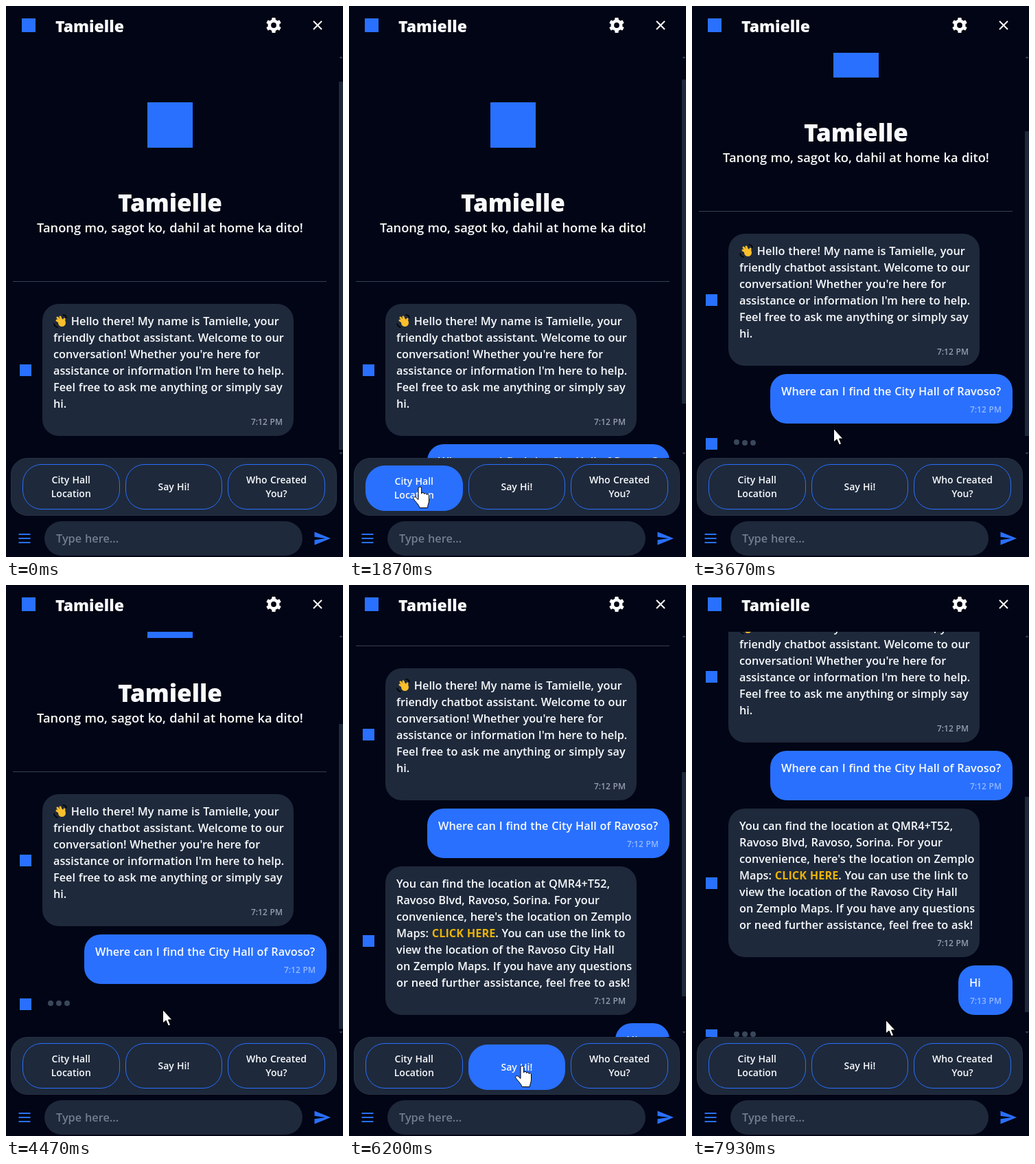
Animation of 491 by 801 pixels, one loop 8 s. Source, as an HTML page:

```html
<!DOCTYPE html>
<html lang="en">
<head>
<meta charset="utf-8">
<title>Chat assistant</title>
<style>
  :root { --bg: #020515; --slate: #1e293b; --line: #334155; --blue: #2970ff; }
  html, body { margin: 0; width: 100%; height: 100%; overflow: hidden; background: var(--bg); }
  body { position: relative; color: #f8fafc; font: 600 16.3px/24px "Open Sans", "Noto Sans", sans-serif; word-spacing: .6px; white-space: nowrap; }
  body * { position: absolute; box-sizing: border-box; }
  p, b, br, .wave, .wave * { position: static; }
  p { margin: 0; }
  svg { overflow: visible; }
  .logo { background: var(--blue); }
  .name { font-weight: 800; }
  .center { left: 0; width: 478px; text-align: center; }

  #view { left: 0; top: 68px; width: 491px; height: 589px; overflow: hidden; }
  #feed { left: 0; top: -68px; width: 491px; height: 1100px; }
  .bubble { padding: 13px 16px; border-radius: 24px; background: var(--slate); }
  .bot { left: 53px; width: 366px; }
  .user { right: 24px; background: var(--blue); }
  .bubble i { right: 16px; bottom: 8px; font-size: 12px; font-style: normal; color: #949eae; }
  .user i { color: #94b8ff; }
  .bubble b { color: #eab308; }
  .wave { display: inline-block; width: 20px; height: 20px; margin-right: 1px; vertical-align: -4px; }
  .face { left: 20px; width: 17px; height: 17px; }
  .dot { top: 12px; width: 8px; height: 8px; border-radius: 50%; background: #3a475a; }
  #thumb { left: 485px; width: 6px; background: var(--slate); }

  #panel { left: 7px; top: 657px; width: 475px; height: 84px; border: 1px solid #273346; border-radius: 24px; background: var(--slate); }
  .chip { top: 666px; width: 141.6px; height: 66px; border: 1px solid var(--blue); border-radius: 28px;
    display: flex; align-items: center; justify-content: center; text-align: center; font-size: 14px; line-height: 20px; }
  .chip.hot { background: var(--blue); }
  #field { left: 56px; top: 749px; width: 376px; height: 50px; padding-left: 17px; border-radius: 25px; background: var(--slate); color: #727e8f; line-height: 51px; }
</style>
</head>
<body>
<div id="view">
  <div id="feed">
    <div class="logo" style="left:206px;top:140px;width:66px;height:66px"></div>
    <div class="center name" style="top:262px;font-size:35px;line-height:48px">Tamielle</div>
    <div class="center" style="top:310px;font-size:18.300px">Tanong mo, sagot ko, dahil at home ka dito!</div>
    <div style="left:10px;top:400px;width:457px;height:1px;background:var(--line)"></div>

    <div class="logo face" style="top:521px"></div>
    <div class="bubble bot" style="top:433px;height:192px">
      <p><svg class="wave" viewBox="0 0 20 20" fill="none" stroke="#fbbf2c" stroke-width="3" stroke-linecap="round">
        <circle cx="12.5" cy="12.5" r="4" fill="#fbbf2c"/>
        <path d="M11 13L5 9M11 11L6 5M12.500 10L10 4M15 13L16 7"/>
        <path d="M1 14q1 4 5 5M14 1q4 0 5 4" stroke="#000" stroke-width="1.500"/>
      </svg> Hello there! My name is Tamielle, your</p>
      <p>friendly chatbot assistant. Welcome to our</p>
      <p>conversation! Whether you're here for</p>
      <p>assistance or information I'm here to help.</p>
      <p>Feel free to ask me anything or simply say</p>
      <p>hi.</p>
      <i>7:12 PM</i>
    </div>

    <div id="ask" class="bubble user" style="top:637px;width:353px;height:72px">
      <p>Where can I find the City Hall of Ravoso?</p><i>7:12 PM</i>
    </div>

    <div id="reply">
      <div class="logo face" style="top:821px"></div>
      <div class="bubble bot" style="top:721px;height:216px">
        <p>You can find the location at QMR4+T52,</p>
        <p>Ravoso Blvd, Ravoso, Sorina. For your</p>
        <p>convenience, here's the location on Zemplo</p>
        <p>Maps: <b>CLICK HERE</b>. You can use the link to</p>
        <p>view the location of the Ravoso City Hall</p>
        <p>on Zemplo Maps. If you have any questions</p>
        <p>or need further assistance, feel free to ask!</p>
        <i>7:12 PM</i>
      </div>
    </div>

    <div id="hi" class="bubble user" style="top:949px;width:79px;height:72px"><p>Hi</p><i>7:13 PM</i></div>

    <div id="typing">
      <div class="logo face" style="top:9px"></div>
      <div class="dot" style="left:61px"></div>
      <div class="dot" style="left:73px"></div>
      <div class="dot" style="left:85px"></div>
    </div>
  </div>
</div>
<div id="thumb"></div>

<div class="logo" style="left:23px;top:18px;width:20px;height:20px"></div>
<div class="name" style="left:72px;top:13px;font-size:23px;line-height:32px">Tamielle</div>

<div id="panel"></div>
<div class="chip" style="left:24px"><p>City Hall<br>Location</p></div>
<div class="chip" style="left:173.600px"><p>Say Hi!</p></div>
<div class="chip" style="left:323.200px"><p>Who Created<br>You?</p></div>
<div id="field">Type here...</div>

<svg width="491" height="801" style="left:0;top:0">
  <g transform="translate(390 28)" fill="#fff">
    <circle r="6.2" fill="none" stroke="#fff" stroke-width="4.6"/>
    <g id="teeth"><rect id="tooth" x="-2.7" y="-11" width="5.400" height="5" rx="1"/></g>
  </g>
  <path d="M448 22l12 12m0-12l-12 12" stroke="#fff" stroke-width="2"/>
  <path d="M485.500 76l2.500-3 2.500 3zM485.500 649l2.500 3 2.500-3z" fill="#334155"/>
  <path d="M18.500 768h17m-17 6h17m-17 6h17" stroke="#2970ff" stroke-width="2"/>
  <path d="M449.500 764.500l23.500 9.500-23.500 9.500v-7.200l16-2.300-16-2.300z" fill="#2970ff"/>
  <g id="cursor" fill="#fff" stroke="#000" stroke-width="1" stroke-linejoin="round">
    <path id="arrow" d="M.5 .5V20L5 16 8.500 24 11.500 22.500 8.500 15H14Z"/>
    <path id="hand" d="M0 2.300a2.300 2.300 0 0 1 4.600 0V10a2 2 0 0 1 4 .5a2 2 0 0 1 3.700 1a1.800 1.800 0 0 1 3.200 1.500V20c0 4-2 6-2 10.500H2C1 26-4 22-7 17.500c-1-2.500 2-4 4-1.800L0 18.500Z"/>
    <path id="beam" d="M-3.500 -7.500h2.500l1 1 1-1h2.500M0-6.500V7M-3.500 8h2.500l1-1 1 1h2.500" fill="none" stroke="#cbd5e1"/>
  </g>
</svg>

<script>
const LOOP = 8000, FPS = 15;
const $ = id => document.getElementById(id);
const show = (el, on) => { el.style.display = on ? '' : 'none'; };

for (let a = 60; a < 360; a += 60) {
  const tooth = $('tooth').cloneNode();
  tooth.removeAttribute('id');
  tooth.setAttribute('transform', `rotate(${a})`);
  $('teeth').append(tooth);
}

// Moments when messages appear
const ASK = 1867, WAIT = 3600, REPLY = 5333, HI = 6200, WAIT2 = 7933;

// Smooth scrolls: start, duration, distance
const scrolls = [[ASK, 280, 84], [3582, 300, 45], [5350, 400, 183], [HI, 333, 84]];

// Pointer path: time, x, y
const path = [
  [333, 474, 786], [600, 430, 655], [933, 375, 562], [1133, 340, 555],
  [1333, 270, 575], [1600, 130, 675], [1733, 101, 699], [2000, 101, 699],
  [2067, 122, 682], [2133, 170, 634], [2200, 184, 622], [2533, 184, 622],
  [2667, 186, 623], [3333, 186, 623], [3667, 206, 614], [3933, 222, 615],
  [4200, 228, 617], [5400, 228, 617], [5600, 236, 640], [5933, 249, 694],
  [6067, 250, 699], [6200, 250, 699], [6267, 255, 690], [6333, 268, 656],
  [6533, 283, 634], [7133, 283, 634], [7200, 282, 632], [LOOP, 282, 632]
];

// Selectable text: left, right, top, bottom, visible from
const texts = [[69, 403, 446, 590, 0], [130, 451, 650, 674, ASK], [69, 403, 734, 902, REPLY]];

const chips = [...document.querySelectorAll('.chip')];
const dots = [...document.querySelectorAll('.dot')];
const clamp = x => Math.min(1, Math.max(0, x));

function ease(x) {
  const u = 1 - (1 - clamp(x)) ** 1.7;
  return u * u * (3 - 2 * u);
}

function pointer(t) {
  const i = Math.max(1, path.findIndex(p => p[0] >= t));
  const [a, b] = [path[i - 1], path[i]];
  const k = clamp((t - a[0]) / (b[0] - a[0]));
  return [1, 2].map(n => Math.round(a[n] + (b[n] - a[n]) * k));
}

function drawFeed(t, offset) {
  const waiting = t >= WAIT && t < REPLY || t >= WAIT2;
  show($('ask'), t >= ASK);
  show($('reply'), t >= REPLY);
  show($('hi'), t >= HI);
  show($('typing'), waiting);
  $('typing').style.top = (t < REPLY ? 721 : 1033) + 'px';
  $('feed').style.transform = `translateY(${-offset}px)`;

  const phase = (t - (t < WAIT2 ? WAIT : WAIT2)) % 867;
  dots.forEach((dot, i) => {
    const lift = 2 * Math.sin(Math.PI * clamp((phase - i * 165) / 400));
    dot.style.transform = `translateY(${-lift}px)`;
  });

  const total = 621 + (t >= ASK && 84) + (t >= REPLY && 228) + (t >= HI && 84) + (waiting && 45);
  const scale = 564 / total;
  $('thumb').style.top = 81 + (32 + offset) * scale + 'px';
  $('thumb').style.height = 589 * scale + 'px';
}

function drawPointer(t, offset) {
  const [x, y] = pointer(t);
  const pressed = t >= 1733 && t < 1933 || t >= 6133 && t < 6267;
  let over = false;
  chips.forEach(chip => {
    const dx = x - chip.offsetLeft, dy = y - 666;
    const hot = t >= 333 && dx >= 0 && dx < chip.offsetWidth && dy >= 0 && dy < 66;
    chip.classList.toggle('hot', hot);
    chip.style.transform = hot && pressed ? 'translateY(2px)' : '';
    over = over || hot;
  });
  const onText = y < 657 && texts.some(([l, r, top, bottom, from]) =>
    t >= from && x >= l && x <= r && y + offset >= top && y + offset <= bottom);
  show($('cursor'), t >= 333);
  show($('hand'), over);
  show($('beam'), onText);
  show($('arrow'), !over && !onText);
  $('cursor').setAttribute('transform', `translate(${x} ${y})`);
}

const start = performance.now();

function draw() {
  const now = (performance.now() - start) % LOOP;
  // The picture advances in steps of 1/15 s
  const t = Math.round(Math.floor((now + 4) * FPS / 1000) * 1000 / FPS) % LOOP;
  const offset = Math.round(scrolls.reduce((sum, [from, time, dist]) => sum + dist * ease((t - from) / time), 0));
  drawFeed(t, offset);
  drawPointer(t, offset);
  requestAnimationFrame(draw);
}
draw();
</script>
</body>
</html>
```
